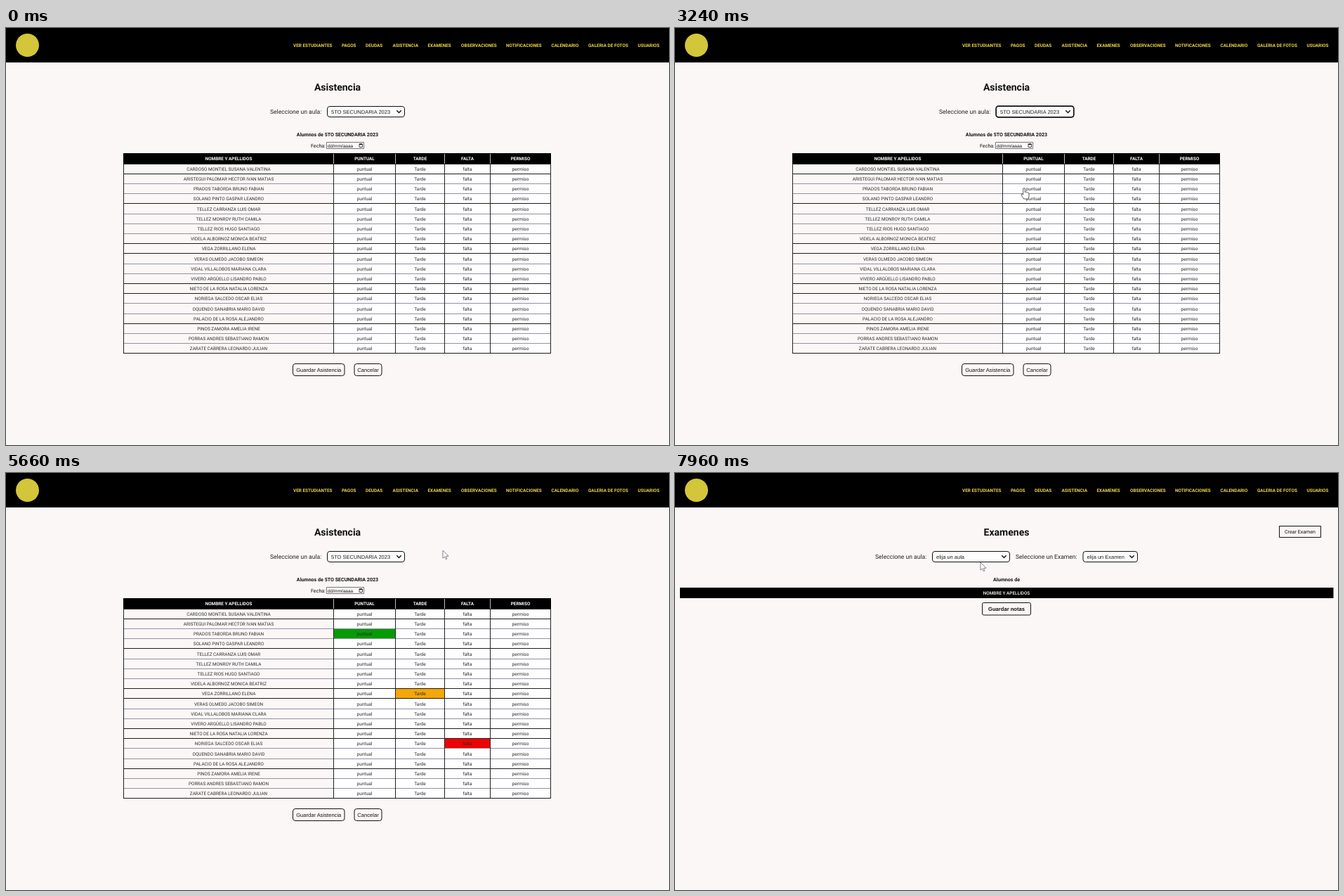
An HTML page with a canvas that plays this animation: 944x593 px, repeating every 7990 ms.

```html
<!DOCTYPE html>
<html lang="es">
<head>
<meta charset="utf-8">
<title>Asistencia</title>
<style>
  html, body { margin: 0; width: 100%; height: 100%; overflow: hidden; background: #fbf7f6; }
  canvas { display: block; }
</style>
</head>
<body>
<canvas id="stage" width="944" height="593"></canvas>
<script>
const ctx = document.getElementById('stage').getContext('2d');
const LOOP = 7990, PAGE_CHANGE = 6720;
const ROBOTO = 'Roboto, sans-serif', ARIAL = '"Liberation Sans", Arial, sans-serif';
const PAPER = '#fbf7f6', INK = '#111';

const menu = [
  ['VER ESTUDIANTES', 409], ['PAGOS', 478], ['DEUDAS', 512], ['ASISTENCIA', 550.5],
  ['EXAMENES', 600.5], ['OBSERVACIONES', 648], ['NOTIFICACIONES', 712],
  ['CALENDARIO', 776.5], ['GALERIA DE FOTOS', 829], ['USUARIOS', 899.5]
];
const students = [
  'CARDOSO MONTIEL SUSANA VALENTINA', 'ARISTEGUI PALOMAR HECTOR IVAN MATIAS',
  'PRADOS TABORDA BRUNO FABIAN', 'SOLANO PINTO GASPAR LEANDRO',
  'TELLEZ CARRANZA LUIS OMAR', 'TELLEZ MONROY RUTH CAMILA',
  'TELLEZ RIOS HUGO SANTIAGO', 'VIDELA ALBORNOZ MONICA BEATRIZ',
  'VEGA ZORRILLANO ELENA', 'VERAS OLMEDO JACOBO SIMEON',
  'VIDAL VILLALOBOS MARIANA CLARA', 'VIVERO ARGÜELLO LISANDRO PABLO',
  'NIETO DE LA ROSA NATALIA LORENZA', 'NORIEGA SALCEDO OSCAR ELIAS',
  'OQUENDO SANABRIA MARIO DAVID', 'PALACIO DE LA ROSA ALEJANDRO',
  'PINOS ZAMORA AMELIA IRENE', 'PORRAS ANDRES SEBASTIANO RAMON',
  'ZARATE CABRERA LEONARDO JULIAN'
];
const headers = ['NOMBRE Y APELLIDOS', 'PUNTUAL', 'TARDE', 'FALTA', 'PERMISO'];
const options = ['', 'puntual', 'Tarde', 'falta', 'permiso'];
const columns = [167, 466, 554, 624, 689, 775];
const TABLE_TOP = 178, ROWS_TOP = 193, ROW = 14.2;
const strongLines = [0, 1, 4, 8, 9, 12, 13, 16, 19];
const lineY = i => Math.floor(ROWS_TOP + i * ROW);

// Cells marked by a click
const marks = [
  { time: 3300, row: 2, col: 1, color: '#069a06' },
  { time: 4130, row: 8, col: 2, color: '#f5a608' },
  { time: 4440, row: 13, col: 3, color: '#ec0303' }
];

// Pointer path: time, x, y
const path = [
  [30, 530, 122], [350, 515, 200], [820, 590, 206], [1400, 660, 203], [2000, 742, 194],
  [2430, 735, 204], [3240, 497, 228], [3400, 498, 229], [3850, 545, 260], [4100, 587, 313],
  [4160, 589, 314], [4410, 655, 384], [4470, 655, 384], [4840, 628, 176],
  [5660, 622, 110], [6450, 614, 23], [6800, 614, 23], [7900, 435, 127], [LOOP, 435, 127]
];

function text(str, x, y, size, { font = ROBOTO, weight = 400, color = INK, align = 'center' } = {}) {
  ctx.font = `${weight} ${size}px ${font}`;
  ctx.fillStyle = color;
  ctx.textAlign = align;
  ctx.fillText(str, x, y + size * 0.355);
}

function rect(x, y, w, h, color) {
  ctx.fillStyle = color;
  ctx.fillRect(x, y, w, h);
}

function box(x, y, w, h, radius, { fill = '#fdfdfd', stroke = INK, width = 1 } = {}) {
  ctx.beginPath();
  ctx.roundRect(x, y, w, h, radius);
  ctx.fillStyle = fill;
  ctx.fill();
  ctx.strokeStyle = stroke;
  ctx.lineWidth = width;
  ctx.stroke();
}

function select(label, x, w, focused) {
  const grow = focused ? .35 : 0;
  box(x + .5 - grow, 111.5 - grow, w - 1 + 2 * grow, 15 + 2 * grow, 3.5, { width: 1 + 2 * grow });
  text(label, x + 6, 119, 7.5, { font: ARIAL, align: 'left', color: '#222' });
  const cx = x + w - 8.5;
  ctx.beginPath();
  ctx.moveTo(cx - 3.2, 117.3);
  ctx.lineTo(cx, 120.6);
  ctx.lineTo(cx + 3.2, 117.3);
  ctx.lineWidth = 1.4;
  ctx.stroke();
}

function button(label, x, y, w, h, radius, size, style) {
  box(x, y, w, h, radius, { fill: PAPER });
  text(label, x + w / 2, y + h / 2, size, style);
}

function navBar() {
  rect(0, 0, 944, 49, '#000');
  ctx.beginPath();
  ctx.arc(30.5, 24.5, 16.5, 0, 7);
  ctx.fillStyle = '#d3c63a';
  ctx.fill();
  for (const [label, x] of menu)
    text(label, x, 24.6, 6.4, { weight: 700, color: '#efd64a', align: 'left' });
}

function table(t) {
  const bottom = lineY(students.length) + 1;
  const [left, firstOption] = columns, right = columns.at(-1) + 1;
  rect(firstOption, ROWS_TOP, right - firstOption, bottom - ROWS_TOP, '#fdfefd');
  for (const { time, row, col, color } of marks)
    if (t >= time)
      rect(columns[col], lineY(row), columns[col + 1] - columns[col], lineY(row + 1) - lineY(row), color);

  for (let i = 0; i <= students.length; i++)
    rect(left, lineY(i), right - left, 1, strongLines.includes(i) ? '#1c1c1c' : '#9292a4');
  for (const x of columns) rect(x, TABLE_TOP, 1, bottom - TABLE_TOP, '#222');

  rect(left, TABLE_TOP, right - left, ROWS_TOP - TABLE_TOP, '#000');
  headers.forEach((label, c) => {
    const center = (columns[c] + columns[c + 1] + 1) / 2;
    if (c) rect(columns[c], TABLE_TOP + 1, 1, ROWS_TOP - TABLE_TOP - 1, '#bbb');
    text(label, center, 186.1, 6.4, { weight: 700, color: '#fff' });
    students.forEach((name, r) =>
      text(c ? options[c] : name, center, ROWS_TOP + (r + .5) * ROW + .4, c ? 6.55 : 6.4, { color: '#2b2b2b' }));
  });
}

function attendancePage(t) {
  text('Asistencia', 472, 83.8, 14, { weight: 700 });
  text('Seleccione un aula:', 376, 119.3, 8.55, { align: 'left', color: '#222' });
  select('5TO SECUNDARIA 2023', 457, 111, t >= 30 && t < marks[0].time);
  text('Alumnos de 5TO SECUNDARIA 2023', 472, 151.8, 7.1, { weight: 700 });
  text('Fecha:', 434, 167, 7.15, { align: 'left' });
  box(456.5, 162.5, 53, 9, 0, { stroke: '#777' });
  text('dd/mm/aaaa', 458, 167.3, 6.5, { font: ARIAL, align: 'left' });
  box(503, 165, 4.5, 4.5, .5, { width: .8 });
  rect(503, 164.6, 4.5, 1.4, INK);
  table(t);
  button('Guardar Asistencia', 408.5, 477.5, 73.5, 17, 3.5, 7.6, { font: ARIAL });
  button('Cancelar', 496, 477.5, 39, 17, 3.5, 7.6, { font: ARIAL });
}

function examsPage() {
  text('Examenes', 472, 83.8, 14, { weight: 700 });
  button('Crear Examen', 860.5, 75.5, 59, 16, 0, 7.1);
  text('Seleccione un aula:', 285, 119.3, 8.55, { align: 'left', color: '#222' });
  select('elija un aula', 366, 111);
  text('Seleccione un Examen:', 485, 119.3, 8.55, { align: 'left', color: '#222' });
  select('elija un Examen', 580.5, 78.5);
  text('Alumnos de', 472, 151.8, 7.1, { weight: 700 });
  rect(7, 163, 930.5, 15, '#000');
  text('NOMBRE Y APELLIDOS', 472, 170.3, 6.4, { weight: 500, color: '#fff' });
  button('Guardar notas', 437.5, 184.5, 69, 17.5, 2, 7.6, { font: ARIAL, weight: 700 });
}

const hand = new Path2D(
  'M-1.3 9V1Q-1.3 -.3 0 -.3T1.3 1V5.4Q2.4 4.6 3.4 5.8Q4.6 5.2 5.3 6.4Q7 6 7 7.8V11' +
  'Q7 13 5.8 15H-.6Q-1.6 12.6-3.9 9.8Q-4.2 8.2-2.9 8.2Z');
const arrow = new Path2D('M0 0V11.2L2.6 8.9L4.3 12.7L6 12L4.4 8.3H8Z');

function pointer(t) {
  if (t < path[0][0]) return;
  const i = Math.max(1, path.findIndex(p => p[0] >= t));
  const [t0, x0, y0] = path[i - 1], [t1, x1, y1] = path[i];
  const u = (t - t0) / (t1 - t0), k = u * u * (3 - 2 * u);
  const x = x0 + (x1 - x0) * k, y = y0 + (y1 - y0) * k;
  const overTable = t < PAGE_CHANGE && x > 467 && y > 175 && y < 463;
  const shape = overTable || y < 48 ? hand : arrow;
  ctx.save();
  ctx.translate(x, y);
  ctx.fillStyle = '#fff';
  ctx.fill(shape);
  ctx.strokeStyle = shape === hand ? '#333' : '#667';
  ctx.lineWidth = .8;
  ctx.stroke(shape);
  ctx.restore();
}

function draw(now) {
  const t = now % LOOP;
  rect(0, 0, 944, 593, PAPER);
  navBar();
  if (t < PAGE_CHANGE) attendancePage(t);
  else examsPage();
  pointer(t);
}

const start = performance.now();
ctx.textRendering = 'geometricPrecision';
(function frame() {
  draw(performance.now() - start);
  requestAnimationFrame(frame);
})();
</script>
</body>
</html>
```
